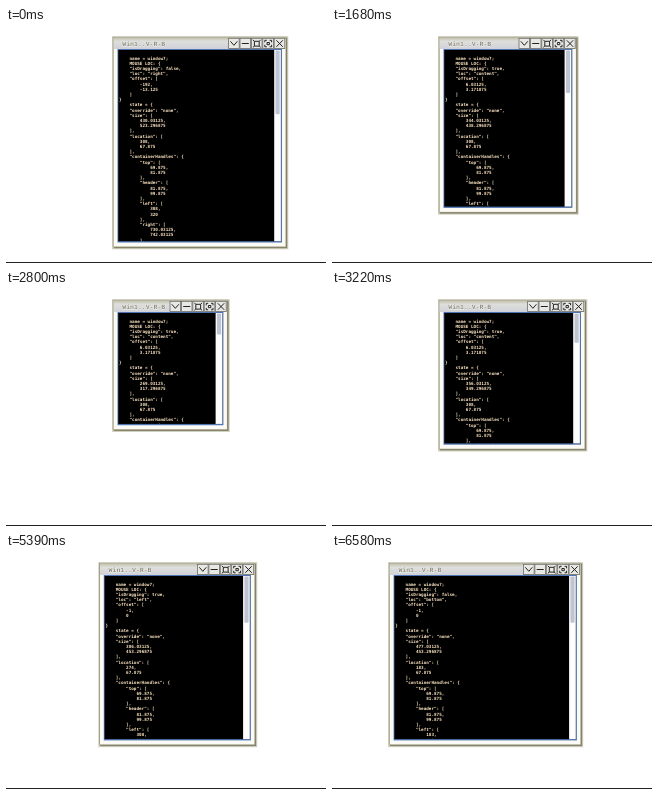
Animation, 320 px wide and 235 px high, one loop 6860 ms. Source, as an HTML page:

```html
<!DOCTYPE html>
<html lang="en">
<head>
<meta charset="utf-8">
<title>Resizable window</title>
<style>
  html, body { margin: 0; width: 100%; height: 100%; overflow: hidden; background: #fff; }
  svg { display: block; width: 100vw; height: 100vh; }
  text { font-weight: bold; white-space: pre; text-rendering: geometricPrecision; }
  .code { font: bold 4.3px "DejaVu Sans Mono", "Liberation Mono", monospace; fill: #ffe6c4; }
  .title {
    font: bold 6.5px "Liberation Mono", "DejaVu Sans Mono", monospace;
    fill: #908d80; stroke: #f4f4f0; stroke-width: .8; paint-order: stroke;
  }
  .icon { fill: none; stroke: #222; stroke-width: 1; }
</style>
</head>
<body>
<svg id="stage" viewBox="0 0 320 235">
  <defs>
    <linearGradient id="bar" x2="0" y2="1">
      <stop offset="0" stop-color="#c4c1ae"/>
      <stop offset=".3" stop-color="#dededc"/>
      <stop offset="1" stop-color="#d0d2d8"/>
    </linearGradient>
    <clipPath id="pageClip"><rect id="clipBox"/></clipPath>
    <clipPath id="barClip"><rect id="barBox"/></clipPath>
  </defs>
  <rect width="320" height="235" fill="#fff"/>
  <rect y="234" width="320" height="1" fill="#222"/>
</svg>
<script>
const LOOP = 6860, STEP = 70, SCALE = 0.4, TOP = 9, LINE = 5.2, COLUMN = 2.59;
const stage = document.getElementById('stage');

// time, left, right, bottom of the window
const poses = [
  [0, 107.3, 279.4, 218.4], [630, 107.3, 279.4, 218.4], [910, 107.3, 290.3, 223.6],
  [1120, 107.3, 294, 224], [1330, 107.3, 292, 222.5], [1610, 107.3, 245, 184.3],
  [1680, 107.3, 243.8, 183.8], [2030, 107.3, 219.5, 161], [2240, 107.3, 211.5, 133.2],
  [2730, 107.3, 215, 136], [3150, 107.3, 249.9, 148.8], [3220, 107.3, 252.4, 157.6],
  [3430, 107.3, 253, 180], [3710, 107.3, 248.3, 190.3], [4970, 107.3, 248.3, 190.3],
  [5320, 93.8, 248.3, 190.3], [5390, 93.6, 248.3, 190.3], [5670, 78.5, 248.3, 190.3],
  [6090, 57.4, 248.3, 190.3], [LOOP, 57.4, 248.3, 190.3]
];

// time, dragging, hovered part, offset
const mouse = [
  [0, false, 'right', -192, -13.125],
  [140, false, 'content', -192, -13.125],
  [280, false, 'bottom-right', -192, -13.125],
  [560, true, 'bottom-right', 6.03125, 3.171875],
  [1400, true, 'content', 6.03125, 3.171875],
  [3990, false, 'content', 6.03125, 3.171875],
  [4130, false, 'left', 6.03125, 3.171875],
  [4760, false, 'left', -1, 0],
  [4900, true, 'left', -1, 0],
  [6230, false, 'left', -1, 0],
  [6440, false, 'bottom', -1, 0]
];

function add(tag, attrs, parent = stage) {
  const node = document.createElementNS('http://www.w3.org/2000/svg', tag);
  set(node, attrs);
  return parent.appendChild(node);
}
function set(node, attrs) {
  for (const key in attrs) node.setAttribute(key, attrs[key]);
}
function place(node, x, y, right, bottom) {
  set(node, { x, y, width: right - x, height: bottom - y });
}
const rect = (fill, parent) => add('rect', { fill }, parent);

const shadowSoft = rect('#d2d0bf');
const shadow = rect('#85826a');
const edge = rect('#a3a08a');
const frame = rect('#fbfaf4');
const bar = rect('url(#bar)');
const titleGroup = add('g', { 'clip-path': 'url(#barClip)' });
const titles = [0, 1].map(() => add('text', { class: 'title' }, titleGroup));
const border = rect('#4f74b3');
const page = rect('#000');
const track = rect('#fdfdfd');
const thumb = add('rect', { rx: 0.8 });
const codeGroup = add('g', { 'clip-path': 'url(#pageClip)' });
const buttons = add('g', {});

const icons = [
  'M1.8 3 L5.3 7 L8.8 3',
  'M1.8 5.2 H8.8',
  'M3 3 H7.8 V7.8 H3 Z M1.5 1.5 L3 3 M9.3 1.5 L7.8 3 M1.5 9 L3 7.8 M9.3 9 L7.8 7.8',
  'M2 4 V2 H4 M6.8 2 H8.8 V4 M8.8 6.5 V8.5 H6.8 M4 8.5 H2 V6.5 M4.2 4.2 H6.6 V6.4 H4.2 Z',
  'M2.2 2 L8.6 8.5 M8.6 2 L2.2 8.5'
];
icons.forEach((d, i) => {
  const g = add('g', { transform: `translate(${i * 11.4} 0)` }, buttons);
  add('rect', { x: 0, y: 0, width: 10.6, height: 10.2, fill: '#e8e8e4', stroke: '#6c6c68', 'stroke-width': 0.8 }, g);
  add('path', { d, class: 'icon' }, g);
});

const codeLines = Array.from({ length: 42 }, () => add('text', { class: 'code' }, codeGroup));

function poseAt(t) {
  const i = Math.max(1, poses.findIndex(p => p[0] >= t));
  const a = poses[i - 1], b = poses[i];
  const k = Math.max(0, (t - a[0]) / (b[0] - a[0]));
  return [1, 2, 3].map(j => a[j] + (b[j] - a[j]) * k);
}

const pair = (indent, name, a, b) => [
  [indent, `"${name}": [`], [indent + 4, a + ','], [indent + 4, String(b)], [indent, '],']
];

// The printed state trails the window by one step.
function codeFor(t) {
  const [left, right, bottom] = poseAt(Math.max(0, t - STEP));
  const [, dragging, part, dx, dy] = mouse.filter(m => m[0] <= t).pop();
  const width = Math.floor((right - left) / SCALE) + 0.03125;
  const height = Math.floor((bottom - TOP) / SCALE) + 0.296875;
  const x = Math.floor((left + 16) / SCALE);
  const handle = t < 6230 ? 308 : x;
  return [
    [4, 'name = window7;'],
    [4, 'MOUSE LOC: {'],
    [4, `"isDragging": ${dragging},`],
    [4, `"loc": "${part}",`],
    [4, '"offset": ['], [8, dx + ','], [8, String(dy)], [4, ']'],
    [0, '}'],
    [4, 'state = {'],
    [4, '"override": "none",'],
    ...pair(4, 'size', width, height),
    ...pair(4, 'location', x, 67.875),
    [4, '"containerHandles": {'],
    ...pair(8, 'top', 69.875, 81.875),
    ...pair(8, 'header', 81.875, 99.875),
    ...pair(8, 'left', handle, handle + 12),
    ...pair(8, 'right', 730.03125, 742.03125),
    ...pair(8, 'bottom', 583.171875, 595.171875)
  ];
}

function draw(t) {
  const [left, right, bottom] = poseAt(t);
  const focused = t < 560 || t >= 1400;
  const inner = { x: left + 5, y: TOP + 13, right: right - 4.5, bottom: bottom - 5.2 };
  const scrollX = inner.right - 6.7;

  place(shadowSoft, left - 1.3, TOP - 0.8, right + 2.9, bottom + 2.9);
  place(shadow, left + 0.5, TOP + 0.5, right + 1.8, bottom + 1.8);
  place(edge, left - 0.6, TOP - 0.2, right + 0.5, bottom + 0.5);
  place(frame, left + 0.4, TOP + 0.8, right + 0.1, bottom + 0.1);
  place(bar, left + 0.4, TOP + 0.8, right, TOP + 12);
  place(border, inner.x - 0.8, inner.y - 1, inner.right + 1.1, inner.bottom + 1.3);
  border.setAttribute('fill', focused ? '#4f74b3' : '#a9a9a2');
  place(page, inner.x, inner.y, inner.right, inner.bottom);
  place(track, scrollX, inner.y, inner.right, inner.bottom);
  const length = (inner.bottom - inner.y) ** 2 / 570;
  place(thumb, scrollX + 1.3, inner.y + 0.5, inner.right - 1.2, inner.y + length);
  thumb.setAttribute('fill', focused ? '#bec4d2' : '#bdbdbd');
  place(document.getElementById('clipBox'), inner.x, inner.y, scrollX, inner.bottom);
  place(document.getElementById('barBox'), left + 0.4, TOP + 0.8, right, TOP + 12);

  const buttonsX = right - 56.8;
  buttons.setAttribute('transform', `translate(${buttonsX} ${TOP + 1.3})`);

  // A narrow header breaks the title at its last fitting hyphen.
  const wrapped = left + 9 + 43 > buttonsX;
  const parts = wrapped ? ['Win1..V-', 'R-B'] : ['Win1..V-R-B', ''];
  titles.forEach((node, i) => {
    set(node, { x: left + 9, y: TOP + (wrapped ? 5 + i * 7.2 : 8.9) });
    node.textContent = parts[i];
  });

  const code = codeFor(t);
  codeLines.forEach((node, i) => {
    const [indent, text] = code[i] || [0, ''];
    set(node, { x: left + 5.8 + indent * COLUMN, y: TOP + 22.6 + i * LINE });
    if (node.textContent !== text) node.textContent = text;
  });
}

const start = performance.now();
function tick() {
  const t = (performance.now() - start) % LOOP;
  draw(Math.floor(t / STEP) * STEP);
  requestAnimationFrame(tick);
}
draw(0);
requestAnimationFrame(tick);
</script>
</body>
</html>
```
